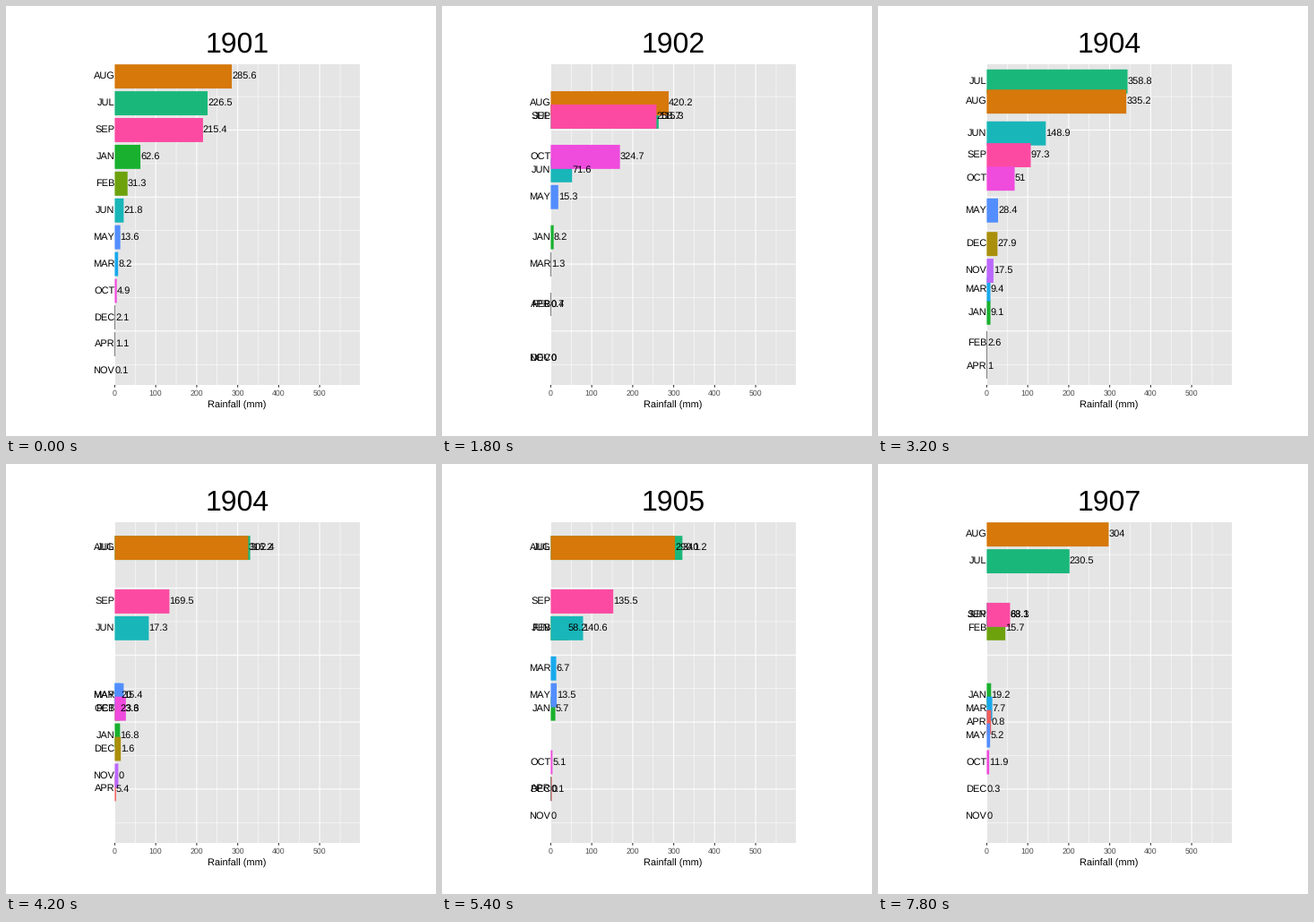
Write a matplotlib script that moves like this. It is 480 px wide and 480 px high and loops after 8 s.

```python
import numpy as np
import matplotlib.pyplot as plt
from matplotlib.animation import FuncAnimation
from matplotlib.patches import Rectangle

plt.rcParams["font.family"] = "Liberation Sans"
plt.rcParams["text.hinting"] = "none"
plt.rcParams["text.kerning_factor"] = 6     # even spacing, no pair kerning

SIZE, DPI = 480, 100
PX = 72 / DPI                       # points per pixel
LEFT, RIGHT, TOP, BOTTOM = 121.4, 395, 65, 423
SCALE = 0.4574                      # pixels per mm of rain
FIRST_BAR, ROW, BAR = 65.2, 29.92, 26.9
MAJOR, MINOR = 1.07, 0.53           # line weights
HAIRLINE = 1.2                      # thinner bars become a grey line
FIRST_YEAR, YEARS = 1901, 8
STEP = 6                            # frames per year: 3 still, 3 moving

# Monthly rainfall in mm, one reading per year; every one is shown as a label
RAIN = {
    "JAN": (62.6, 6.1, 8.2, 9.1, 16.8, 5.7, 2.1, 19.2),
    "FEB": (31.3, 2.3, 0.4, 2.6, 23.6, 58.2, 74.9, 15.7),
    "MAR": (8.2, 2.4, 1.3, 9.4, 20, 6.7, 19.2, 7.7),
    "APR": (1.1, 2, 0.7, 1, 5.4, 0, 20.3, 0.8),
    "MAY": (13.6, 21.4, 15.3, 28.4, 15.4, 13.5, 11.1, 5.2),
    "JUN": (21.8, 32.5, 71.6, 148.9, 17.3, 140.6, 48.6, 63.3),
    "JUL": (226.5, 411.5, 115.3, 358.8, 302.4, 340.2, 173.5, 230.5),
    "AUG": (285.6, 155.4, 420.2, 335.2, 316.2, 290.1, 290.9, 304),
    "SEP": (215.4, 257.2, 258.7, 97.3, 169.5, 135.5, 25.7, 88.1),
    "OCT": (4.9, 13.2, 324.7, 51, 3.3, 5.1, 0, 11.9),
    "NOV": (0.1, 1.2, 0, 17.5, 0, 0, 0, 0),
    "DEC": (2.1, 0, 0, 27.9, 1.6, 0.1, 0.1, 0.3),
}
MONTHS = list(RAIN)


def hue_color(degrees, chroma=100, light=65):
    """Polar LUV colour, shown on a display with a softer gamma."""
    h = np.radians(degrees)
    u = 0.1978 + chroma * np.cos(h) / (13 * light)
    v = 0.4683 + chroma * np.sin(h) / (13 * light)
    y = ((light + 16) / 116) ** 3
    x = 9 * y * u / (4 * v)
    z = y * (12 - 3 * u - 20 * v) / (4 * v)
    to_rgb = np.array([[3.2405, -1.5371, -0.4985],
                       [-0.9693, 1.8760, 0.0416],
                       [0.0556, -0.2040, 1.0572]])
    r, g, b = np.clip(to_rgb @ [x, y, z], 0, 1)
    shown = [0.973 * r + 0.027 * g, 1.03 * g - 0.03 * r, 0.99 * b + 0.01 * g]
    return tuple(np.clip(shown, 0, 1) ** (1 / 1.85))


# Hues are spread evenly over the months in alphabetical order
COLORS = {m: hue_color(15 + 30 * k) for k, m in enumerate(sorted(MONTHS))}


def ranking(year):
    """Months from wettest to driest; later months win ties."""
    order = sorted(reversed(MONTHS), key=lambda m: -RAIN[m][year])
    return {m: k for k, m in enumerate(order)}


RANKS = [ranking(y) for y in range(YEARS)]


def cubic_in_out(t):
    return 4 * t ** 3 if t < 0.5 else 1 - 4 * (1 - t) ** 3


def mix(a, b, t):
    return a + (b - a) * t


fig = plt.figure(figsize=(SIZE / DPI, SIZE / DPI), dpi=DPI, facecolor="white")
ax = fig.add_axes([0, 0, 1, 1])
ax.set_xlim(0, SIZE)
ax.set_ylim(SIZE, 0)
ax.axis("off")


def label(x, y, text="", size=11, ha="left", color="black", z=5):
    return ax.text(x, y, text, fontsize=size * PX, ha=ha, va="baseline",
                   color=color, zorder=z)


def line(xs, ys, width, color="white"):
    ax.plot(xs, ys, color=color, lw=width * PX, zorder=1,
            solid_capstyle="butt", snap=False)


# Panel, grid and axis
ax.add_patch(Rectangle((LEFT, TOP), RIGHT - LEFT, BOTTOM - TOP,
                       fc="#e5e5e5", lw=0, zorder=0))
for k in range(9):
    y = FIRST_BAR + BAR / 2 + ROW * (0.75 + 1.25 * k)
    line([LEFT, RIGHT], [y, y], MAJOR if k % 2 else MINOR)
for k in range(12):
    x = LEFT + 50 * SCALE * k
    line([x, x], [TOP, BOTTOM], MINOR if k % 2 else MAJOR)
    if k % 2 == 0:
        line([x, x], [BOTTOM, BOTTOM + 2.75], MAJOR, "#333333")
        label(x, 435, str(50 * k), 8.8, "center", "#4d4d4d")
label(258.2, 448.6, "Rainfall (mm)", ha="center")
title = label(258.2, 52, size=32, ha="center")

bars, names, amounts = {}, {}, {}
for k, m in enumerate(MONTHS):
    bars[m] = ax.add_patch(Rectangle((LEFT, TOP), 0, BAR, lw=0,
                                     zorder=2 + k / 100))
    names[m] = label(LEFT, 0, m, ha="right", z=3 + k / 100)
    amounts[m] = label(LEFT, 0, z=4 + k / 100)


def draw_bar(bar, top, width, color):
    thin = width < HAIRLINE
    bar.set_snap(thin)
    bar.set_xy((LEFT, top))
    bar.set_width((width > 0.3) if thin else width)
    bar.set_facecolor("#7d7d7d" if thin else color)


def draw(frame):
    i, phase = divmod(frame + 1, STEP)
    j = min(i + 1, YEARS - 1)
    t = max(0, phase - 2) / 4
    e = cubic_in_out(t)
    title.set_text(str(FIRST_YEAR + i + (t > 0.5)))
    for m in MONTHS:
        width = mix(RAIN[m][i], RAIN[m][j], e) * SCALE
        top = FIRST_BAR + ROW * mix(RANKS[i][m], RANKS[j][m], e)
        base = top + BAR / 2 + 2.6
        draw_bar(bars[m], top, width, COLORS[m])
        names[m].set_y(base)
        amounts[m].set_position((LEFT + width, base))
        amounts[m].set_text(f"{RAIN[m][j if t >= 0.5 else i]:g}")


anim = FuncAnimation(fig, draw, frames=40, interval=200, repeat=True,
                     repeat_delay=0, blit=False)
plt.show()
```
